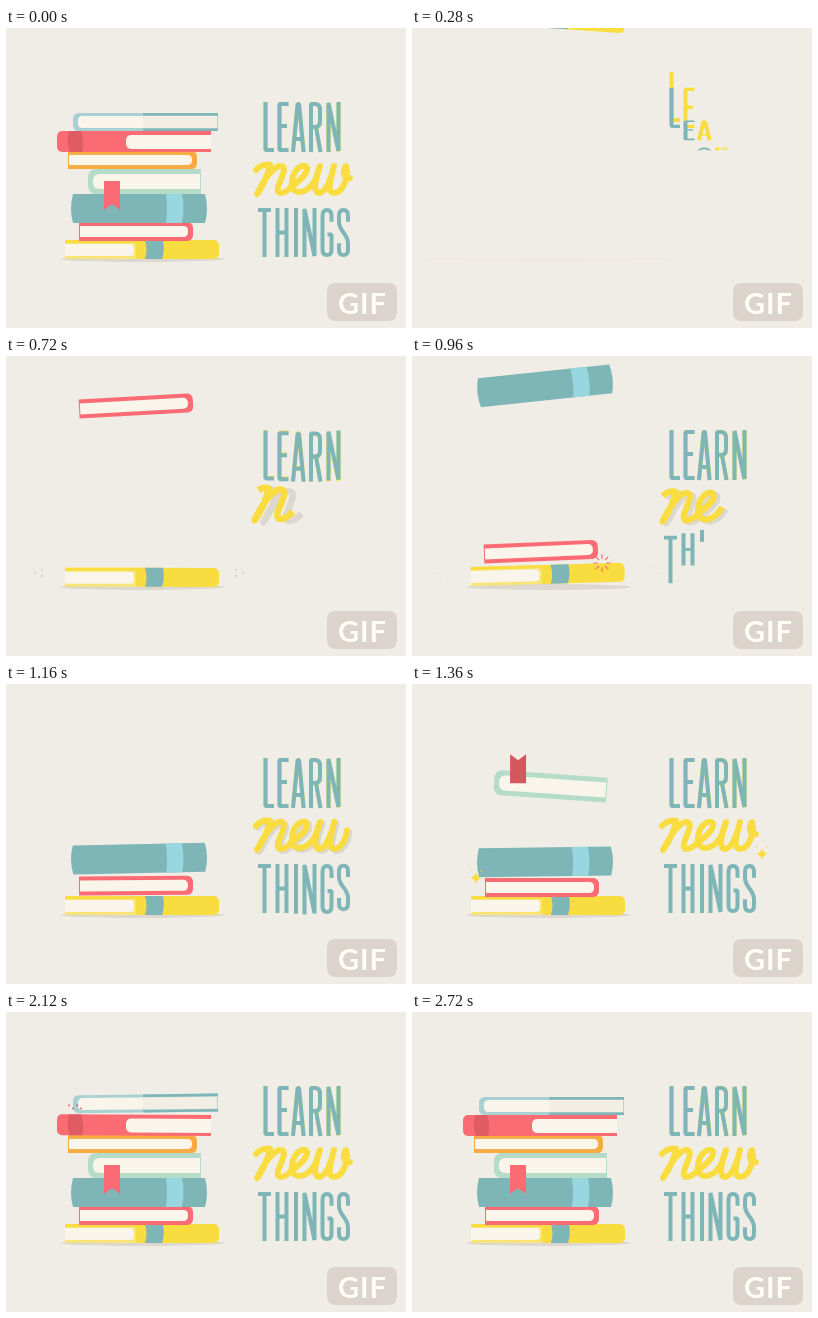
These frames come from a looping animation (400 by 300 pixels, 3040 ms). An HTML page with a canvas:

```html
<!DOCTYPE html>
<html lang="en">
<head>
<meta charset="utf-8">
<title>Learn new things</title>
<style>
  html, body { margin: 0; width: 100%; height: 100%; overflow: hidden; background: #f0ede6; }
  #stage { position: relative; width: 400px; height: 300px; overflow: hidden; }
  canvas { position: absolute; inset: 0; width: 400px; height: 300px; }
  .badge {
    position: absolute; left: 321px; top: 255px; width: 70px; height: 38px;
    border-radius: 8px; background: #dcd4cc; color: #fffdf8;
    font: 700 29px/39px Lato, sans-serif; letter-spacing: 1px; text-indent: 1px; text-align: center;
  }
</style>
</head>
<body>
<div id="stage">
  <canvas id="view" role="img" aria-label="Learn new things"></canvas>
  <div class="badge">GIF</div>
</div>
<script>
const LOOP = 3040, STEP = 40, DROP = 240, FALL = 300;
const C = {
  teal: '#7eb5b6', sky: '#98d7e0', yellow: '#f9dd40', gold: '#f8e577', red: '#fa6b74',
  dark: '#d4565f', mint: '#b5dcc8', orange: '#f8ab45', page: '#f9f5ea', shade: '#dcd7cf', pale: '#a9d1d2'
};
const canvas = document.getElementById('view');
const g = canvas.getContext('2d');
const ratio = Math.max(1, window.devicePixelRatio || 1);
canvas.width = 400 * ratio;
canvas.height = 300 * ratio;

const clamp = v => Math.max(0, Math.min(1, v));
const smooth = v => { v = clamp(v); return v * v * (3 - 2 * v); };
const easeOut = v => 1 - (1 - clamp(v)) ** 3;

// Linear lookup in [time, value] pairs
function track(keys, t) {
  if (t <= keys[0][0]) return keys[0][1];
  for (let i = 1; i < keys.length; i++) {
    const [a, x] = keys[i - 1], [b, y] = keys[i];
    if (t < b) return x + (y - x) * (t - a) / (b - a);
  }
  return keys[keys.length - 1][1];
}

function at(x, y, draw, angle = 0, sx = 1, sy = sx) {
  g.save();
  g.translate(x, y);
  g.rotate(angle * Math.PI / 180);
  g.scale(sx, sy);
  draw();
  g.restore();
}

function box(x, y, w, h, color, radii = 0) {
  g.fillStyle = color;
  g.beginPath();
  g.roundRect(x, y, w, h, radii);
  g.fill();
}

function dot(x, y, r, color, ry = r) {
  g.fillStyle = color;
  g.beginPath();
  g.ellipse(x, y, r, ry, 0, 0, 7);
  g.fill();
}

// Book seen from its fore-edge; the spine is on the left or right
function openBook(x, y, w, h, color, left, edge = 4) {
  const r = h * 0.3, p = r * 0.8;
  box(x, y, w, h, color, left ? [r, 0, 0, r] : [0, r, r, 0]);
  box(left ? x + 5 : x + 1, y + edge, w - 6, h - edge * 2, C.page, left ? [p, 0, 0, p] : [0, p, p, 0]);
}

function bookmark(flip) {
  at(106, 153, () => {
    g.fillStyle = flip < 0 ? C.dark : C.red;
    g.fill(new Path2D('M-8 0H8V29L0 23L-8 29Z'));
  }, flip < 0 ? -4 : 0, 1, flip);
}

const books = [
  { land: 522, cx: 136, cy: 222, tilt: 4, draw() {
    box(59, 212, 76, 19, C.gold, 1);
    box(130, 212, 83, 19, C.yellow, [3, 5, 5, 2]);
    box(59, 212, 76, 3, C.yellow);
    box(59, 216, 69, 12, C.page, [0, 4, 4, 0]);
    g.fillStyle = C.teal;
    g.fill(new Path2D('M139 212H157Q159 222 156 231H139Q142 222 139 212Z'));
  } },
  { land: 840, cx: 130, cy: 203, tilt: -4, draw() {
    openBook(73, 194, 114, 19, C.red, false);
  } },
  { land: 1077, cx: 133, cy: 180, tilt: -7.6, draw() {
    g.fillStyle = C.teal;
    g.fill(new Path2D('M67 166H199Q203 180 199 195H67Q63 180 67 166Z'));
    g.fillStyle = C.sky;
    g.fill(new Path2D('M160 166H176Q179 180 176 195H160Q162 180 160 166Z'));
  } },
  { land: 1394, cx: 139, cy: 153, tilt: 8.7, draw(t) {
    openBook(82, 141, 113, 25, C.mint, true, 5);
    bookmark(track([[1394, -1], [1480, 1.15], [1560, 0.92], [1640, 1]], t));
  } },
  { land: 1570, cx: 127, cy: 132, tilt: -5, draw() {
    openBook(62, 123, 129, 18, C.orange, false);
  } },
  { land: 1737, cx: 128, cy: 114, tilt: 7, draw() {
    box(51, 103, 154, 21, C.red, [5, 0, 0, 5]);
    g.fillStyle = C.dark;
    g.globalAlpha *= 0.7;
    g.fill(new Path2D('M63 103H75Q79 114 76 124H64Q60 114 63 103Z'));
    g.globalAlpha = 1;
    box(120, 107, 85, 14, C.page, [5, 0, 0, 5]);
  } },
  { land: 1763, cx: 139, cy: 94, tilt: -6, slow: 1.3, draw() {
    openBook(67, 85, 145, 18, C.pale, true, 3);
    for (const y of [85, 100.5]) box(137, y, 75, 2.5, C.teal);
    g.globalAlpha = 0.25;
    box(137, 88, 75, 12.5, C.shade);
    g.globalAlpha = 1;
  } }
];

// Height above the resting place: a fall, then three shrinking hops
function height(book, t) {
  let u = t - book.land;
  if (u < 0) return DROP * (1 - Math.max(0, 1 + u / FALL) ** 2);
  for (const [size, time] of [[6, 200], [2.6, 160], [0.8, 120]]) {
    const span = time * (book.slow || 1);
    if (u < span) return size * Math.sin(Math.PI * u / span);
    u -= span;
  }
  return 0;
}

function drawShadow(t) {
  const h = height(books[0], t);
  g.globalAlpha = clamp((DROP - h) / 120);
  dot(136.5, 231, 82 + h * 0.19, C.shade, 3);
  g.globalAlpha = 1;
}

function drawBooks(t) {
  const rock = -1.8 * Math.sin(Math.PI * clamp((t - 860) / 210));
  books.forEach((b, i) => {
    if (t <= b.land - FALL) return;
    const h = height(b, t);
    const pose = () => at(b.cx, b.cy - h, () => {
      g.translate(-b.cx, -b.cy);
      b.draw(t);
    }, b.tilt * Math.sqrt(h / DROP));
    if (i < 2) at(58, 231, () => { g.translate(-58, -231); pose(); }, rock);
    else pose();
  });
}

// Dust thrown out to both sides of a landing book
function dust(t, start, x, y, half) {
  const u = (t - start) / 500;
  if (u <= 0 || u >= 1) return;
  const d = half + 36 * easeOut(u), r = 1.6 * (1 - u) + 0.4;
  for (const side of [-1, 1]) {
    dot(x + side * d, y, r, C.shade);
    for (const dy of [-4, 4]) dot(x + side * (d - 7), y + dy * (0.4 + u), r, C.shade);
  }
}

function burst(t, start, x, y, color) {
  const u = (t - start) / 260;
  if (u <= 0 || u >= 1) return;
  const a = 1 + 7 * u, b = 9 * easeOut(u * 1.5);
  g.strokeStyle = color;
  g.lineWidth = 1.2;
  g.beginPath();
  for (let i = 0; i < 8; i++) {
    const c = Math.cos(i * Math.PI / 4), s = Math.sin(i * Math.PI / 4);
    g.moveTo(x + c * a, y + s * a);
    g.lineTo(x + c * b, y + s * b);
  }
  g.stroke();
}

function twinkle(t, start, x, y) {
  const u = (t - start) / 400;
  if (u > 0 && u < 1) {
    at(x, y, () => {
      g.fillStyle = C.yellow;
      g.fill(new Path2D('M0 -6Q1 -1 6 0Q1 1 0 6Q-1 1 -6 0Q-1 -1 0 -6Z'));
    }, 0, Math.sin(Math.PI * u));
  }
  if (u > 0.2 && u < 1.5) {
    const r = 1.1 * (1 - u / 1.7);
    dot(x - 5, y - 8, r, C.yellow);
    dot(x + 5, y - 7, r, C.yellow);
  }
}

function chips(t) {
  const u = (t - 1840) / 440;
  if (u <= 0 || u >= 1) return;
  for (let i = 0; i < 4; i++) dot(63 + i * 4, 98 + (i % 2) * 3 - 5 * Math.sin(Math.PI * u), 0.9, C.dark);
}

const glyphs = {
  L: 'M2 0V48H10.5', E: 'M11 2H2V48H11M2 24H9.5', A: 'M2 50L6.6 2H8L12.6 50M4 37H11',
  R: 'M2 50V2H6Q11 2 11 8V19Q11 25 6 25H2M7 25L11.5 50', N: 'M2 50V1L12 49V0',
  T: 'M0 2H13M6.5 2V50', H: 'M2 0V50M11 0V50M2 25H11', I: 'M2 0V50',
  G: 'M11 14V8Q11 2 6.5 2T2 8V42Q2 48 6.5 48T11 42V27H7',
  S: 'M11 14V8Q11 2 6.5 2T2 8V14Q2 19 6.5 25T11 36V42Q11 48 6.5 48T2 42V36'
};
for (const k in glyphs) glyphs[k] = new Path2D(glyphs[k]);

function letter(ch, x, y, color, stretch) {
  if (stretch < 0.01) return;
  at(x, y, () => {
    g.strokeStyle = color;
    g.lineWidth = 4;
    g.lineJoin = 'bevel';
    g.lineCap = 'butt';
    g.stroke(glyphs[ch]);
  }, 0, 1, stretch);
}

// Upper word grows to a peak, then swings down to its line
function swing(u) {
  if (u < 140) return -30 * smooth(u / 140);
  const a = (u - 140) / 143;
  return a < Math.PI / 2 ? -30 * Math.cos(a) : 3 * Math.sin((a - Math.PI / 2) * 2) * clamp(1 - (a - Math.PI / 2) / 1.57);
}

function drawWords(t) {
  const top = [257.5, 271.5, 285, 303, 320.5], low = [252, 269.5, 288, 296.5, 314.5, 331];
  for (const [color, lead] of [[C.yellow, 40], [C.teal, 0]]) {
    [...'LEARN'].forEach((ch, i) => {
      const u = t + lead - 180 - i * 40, s = smooth(u / 140);
      letter(ch, top[i], 124 - 50 * s + swing(u), color, s);
    });
  }
  [...'THINGS'].forEach((ch, i) => {
    const u = t - 835 - i * 40, s = smooth(u / 140), v = clamp((u - 140) / 160);
    letter(ch, low[i], 172 + 8 * s, C.teal, s * 0.98 + 0.05 * Math.sin(Math.PI * v) * (1 - v));
  });
}

const script = 'M250 142Q257 135 264 137C262 147 256 160 251 166C257 153 268 137 275 138' +
  'C282 139 274 152 272 159C270 167 277 166 283 161C291 154 302 147 301 140' +
  'C299 134 288 140 286 152C284 165 294 167 303 160C309 155 312 146 314 138' +
  'C310 148 306 164 313 165C320 165 326 148 328 138C325 150 320 164 328 165' +
  'C337 165 343 148 340 138C336 144 338 151 344 150';
const pen = new Path2D(script);
const ruler = document.createElementNS('http://www.w3.org/2000/svg', 'path');
ruler.setAttribute('d', script);
const penLength = ruler.getTotalLength();

function drawScript(t) {
  const done = track([[420, 0], [480, 0.12], [960, 0.58], [1200, 1]], t);
  if (!done) return;
  const lift = track([[480, 1], [720, 0.4], [960, 0.1], [1200, 0]], t);
  const from = 14 * lift;
  const stroke = (dx, dy, color) => at(296 + dx, 152 + dy, () => {
    g.translate(-296, -152);
    g.strokeStyle = color;
    g.lineWidth = 6;
    g.lineCap = g.lineJoin = 'round';
    g.setLineDash(done < 1 ? [Math.max(0.1, penLength * done - from), penLength * 2] : []);
    g.lineDashOffset = 0;
    if (done < 1) {
      g.setLineDash([0, from, Math.max(0.1, penLength * done - from), penLength * 2]);
      if (from < 1) g.setLineDash([penLength * done, penLength * 2]);
    }
    g.lineCap = done < 1 && from >= 1 ? 'butt' : 'round';
    g.stroke(pen);
  }, 0, 1 + 0.25 * lift);
  if (lift) stroke(5 + 22 * lift - 3, -8 * lift + 2, C.shade);
  stroke(5 * lift, -8 * lift, C.yellow);
}

function render(t) {
  if (t < 80) t = LOOP;
  g.setTransform(ratio, 0, 0, ratio, 0, 0);
  g.clearRect(0, 0, 400, 300);
  drawShadow(t);
  dust(t, 522, 133, 217, 76);
  dust(t, 1394, 137, 151, 58);
  drawBooks(t);
  burst(t, 840, 190, 207, C.red);
  chips(t);
  drawWords(t);
  drawScript(t);
  twinkle(t, 1160, 64, 194);
  twinkle(t, 1160, 350, 170);
}

const began = performance.now();
function tick() {
  const t = (performance.now() - began) % LOOP;
  render(Math.floor(t / STEP) * STEP);
  requestAnimationFrame(tick);
}
tick();
</script>
</body>
</html>
```
